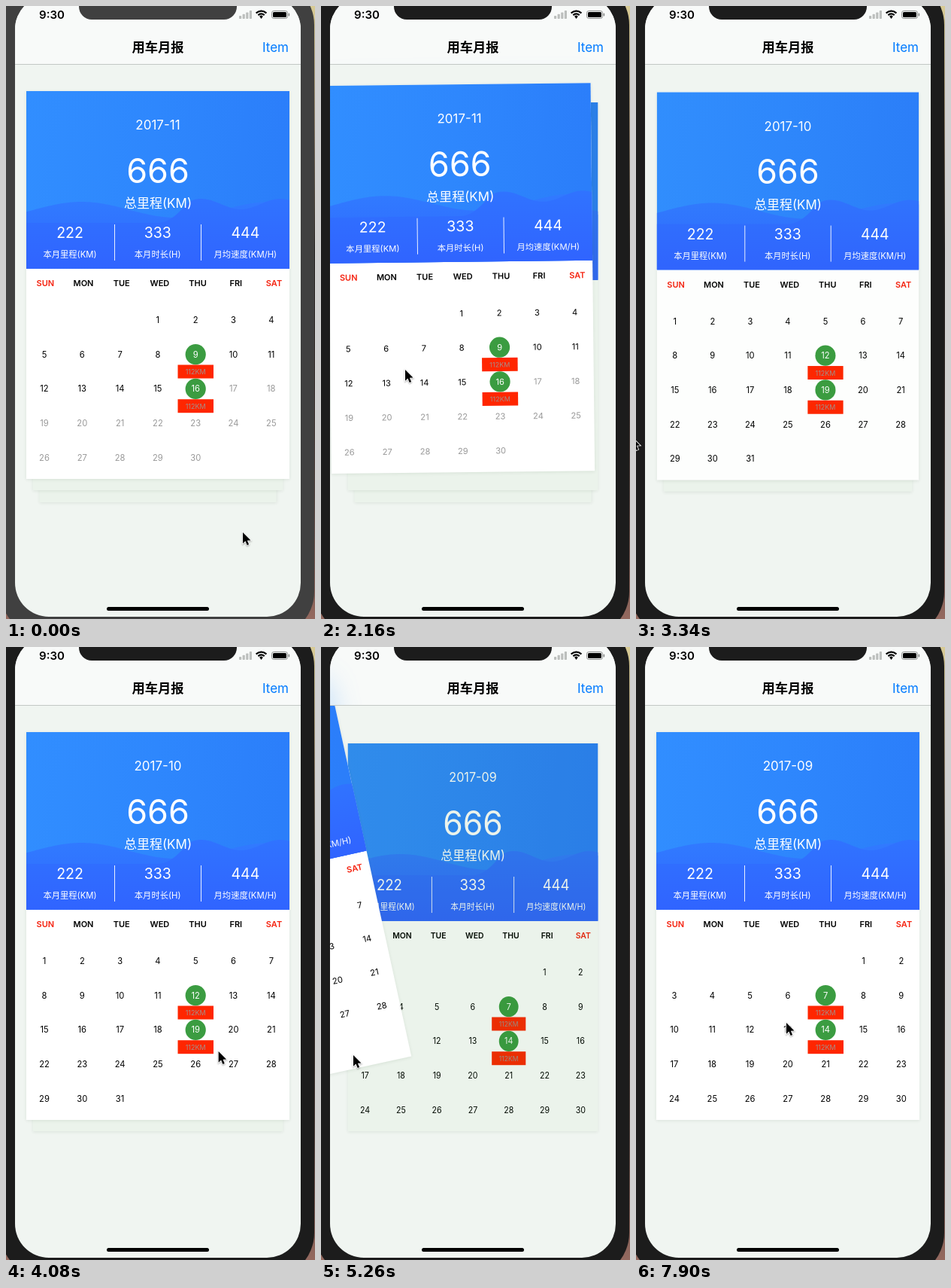
Write an HTML page with a canvas that moves like this. It is 411 by 814 pixels and loops after 8 s.

```html
<!DOCTYPE html>
<html lang="zh-CN">
<head>
<meta charset="utf-8">
<style>
  html, body { margin: 0; width: 100%; height: 100%; overflow: hidden; background: #1c1c1c; }
  canvas { display: block; width: 411px; height: 814px; }
</style>
</head>
<body>
<canvas id="stage"></canvas>
<script>
const W = 411, H = 814, LOOP = 8000, STEP = 147.1, LEAD = 98;
const canvas = document.getElementById('stage');
const ratio = window.devicePixelRatio || 1;
canvas.width = W * ratio;
canvas.height = H * ratio;
const ctx = canvas.getContext('2d');
const FONT = 'Inter, "Noto Sans CJK SC", "Noto Sans CJK", "Noto Sans", sans-serif';

// Card geometry in stage coordinates; times are counted in steps
const CARD = { x: 27, y: 113, w: 350, h: 515, head: 235.7 };
const CX = CARD.x + CARD.w / 2, CY = CARD.y + CARD.h / 2;
const TURN = 0.0007; // radians of tilt per dragged pixel
const FOCUS = 13;    // the window gains focus

const cards = [
  { title: '2017-11', first: 3, days: 30, today: 16, swipe: { start: 13.3, end: 19, dx: -258, dy: -110, arc: -40 } },
  { title: '2017-10', first: 0, days: 31, today: 31, swipe: { start: 27.5, end: 35, dx: -308, dy: -41, arc: -306 } },
  { title: '2017-09', first: 5, days: 30, today: 30 }
];

// Pointer stops: time, x, y
const stops = [
  [6, 315, 699], [9, 289, 597], [12, 289, 597], [14, 112, 483], [19, 30, 486], [22, -5, 573],
  [26, 330, 590], [29, 188, 431], [35, 43, 542], [42, 14, 490], [46, 171, 448], [50, 65, 515],
  [52, 289, 552], [53, 200, 499]
];

const clamp = v => Math.min(1, Math.max(0, v));
const smooth = v => clamp(v) ** 2 * (3 - 2 * clamp(v));

function pointer(k) {
  const i = stops.findIndex(s => s[0] > k);
  if (i < 0) return stops[stops.length - 1].slice(1);
  if (!i) return stops[0].slice(1);
  const [t0, x0, y0] = stops[i - 1], [t1, x1, y1] = stops[i];
  const p = (k - t0) / (t1 - t0);
  return [x0 + (x1 - x0) * p, y0 + (y1 - y0) * p];
}

// Pull along an arc that eases out, then fling to the left
function offset(swipe, k) {
  if (!swipe || k < swipe.start) return { dx: 0, dy: 0 };
  const p = 1 - Math.exp(-(((k - swipe.start) / 2.8) ** 2));
  const fling = 110 * Math.max(0, k - swipe.end) ** 2;
  return { dx: swipe.dx * p - fling, dy: swipe.dy * p + swipe.arc * p * (1 - p) + fling * .2 };
}

// How far the stack has moved up after the swipe
const rise = (swipe, k) => swipe ? 1 - (1 - clamp((k - swipe.end - 1) / 3.75)) ** 3 : 0;

function rect(x, y, w, h, color) {
  ctx.fillStyle = color;
  ctx.fillRect(x, y, w, h);
}

function round(x, y, w, h, r, color) {
  ctx.beginPath();
  ctx.roundRect(x, y, w, h, r);
  if (color) {
    ctx.fillStyle = color;
    ctx.fill();
  }
}

// Text centred on y
function text(s, x, y, size, color, weight = 400, align = 'center') {
  ctx.font = `${weight} ${size}px ${FONT}`;
  ctx.textAlign = align;
  ctx.fillStyle = color;
  ctx.fillText(s, x, y + size * .364);
}

function gradient(x0, y0, x1, y1, ...colors) {
  const g = ctx.createLinearGradient(x0, y0, x1, y1);
  colors.forEach((c, i) => g.addColorStop(i / (colors.length - 1), c));
  return g;
}

// Hill line height(u), u from 0 to 1, filled down to the end of the card head
function wave(height, ...colors) {
  const { x, y, w, head } = CARD;
  ctx.beginPath();
  ctx.moveTo(x, y + head);
  for (let i = 0; i <= w; i += 2) ctx.lineTo(x + i, height(i / w));
  ctx.lineTo(x + w, y + head);
  ctx.fillStyle = gradient(0, 255, 0, y + head, ...colors);
  ctx.fill();
}

const backHill = u => 270.5 - 10.5 * Math.cos((u - .21) / .72 * 2 * Math.PI);
function frontHill(u) {
  const s = smooth((u - .5) / .14);
  return 288 - s * (25 + 7 * Math.cos((u - .665) / .3 * 2 * Math.PI));
}

function cardHead(title) {
  const { x, y, w, head } = CARD;
  rect(x, y, w, head, gradient(x, y, x + w, y + 40, '#318eff', '#2e87fd', '#2b7efa'));
  wave(backHill, '#317bff', '#2f68ff');
  wave(frontHill, '#3073ff', '#3064ff');
  text(title, CX, 158, 17, '#fff');
  text('666', CX, 218.5, 45, '#fff');
  text('总里程(KM)', CX, 262, 17, '#fff');
  [['222', '本月里程(KM)'], ['333', '本月时长(H)'], ['444', '月均速度(KM/H)']].forEach(([n, label], i) => {
    const cx = 85 + i * 116.7;
    text(n, cx, 301, 19.5, '#fff');
    text(label, cx, 330, 11.3, '#fff');
    if (i) rect(144 + (i - 1) * 115, 290, 1, 48, 'rgba(255,255,255,.9)');
  });
}

function cardDays({ first, days, today }) {
  'SUN MON TUE WED THU FRI SAT'.split(' ').forEach((name, i) =>
    text(name, 52.3 + i * 50.7, 368, 11, i % 6 ? '#000' : '#f5220f', 600));
  for (let d = 1; d <= days; d++) {
    const cell = d - 1 + first, col = cell % 7, row = Math.floor(cell / 7);
    const x = 51 + col * 50.3, y = 417 + row * 45.7;
    const marked = col === 4 && (row === 1 || row === 2);
    if (marked) {
      ctx.beginPath();
      ctx.arc(x, y, 13.6, 0, Math.PI * 2);
      ctx.fillStyle = '#3b9c41';
      ctx.fill();
      rect(228.5, y + 13.8, 47.5, 18, '#ff2600');
      text('112KM', x, y + 23, 9, 'rgba(153,153,153,.9)');
    }
    text(d, x, y, 11.2, marked ? '#fff' : d > today ? '#999' : '#000');
  }
}

function place(depth, dx, dy) {
  ctx.translate(CX + dx, CY + dy + 15 * depth + .5 * Math.max(0, depth * (depth - 1)));
  ctx.rotate(dx * TURN);
  ctx.scale(1 - .05 * depth, 1);
  ctx.translate(-CX, -CY);
}

function drawCard(card, depth, { dx, dy }) {
  const { x, y, w, h } = CARD;
  ctx.save();
  place(depth, dx, dy);
  ctx.save();
  ctx.shadowColor = 'rgba(60,90,60,.12)';
  ctx.shadowBlur = 4 * ratio;
  ctx.shadowOffsetY = ratio;
  rect(x, y, w, h, '#fff');
  ctx.restore();
  cardHead(card.title);
  cardDays(card);
  if (depth > 0) rect(x, y, w, h, `rgba(35,125,35,${.09 * Math.min(depth, 1)})`);
  ctx.restore();
}

function statusBar() {
  text('9:30', 61, 11.5, 15, '#000', 600);
  for (let i = 0; i < 4; i++) {
    const h = 4 + i * 2.3;
    round(310 + i * 4.6, 17 - h, 3.2, h, .8, '#bcbfbd');
  }
  ctx.strokeStyle = '#000';
  ctx.lineWidth = 2.2;
  for (const r of [5.6, 9.4]) {
    ctx.beginPath();
    ctx.arc(339.5, 16, r, -Math.PI * .76, -Math.PI * .24);
    ctx.stroke();
  }
  ctx.beginPath();
  ctx.moveTo(339.5, 17);
  ctx.arc(339.5, 16, 3.2, -Math.PI * .76, -Math.PI * .24);
  ctx.fillStyle = '#000';
  ctx.fill();
  round(353.5, 6.5, 21, 10, 2.8);
  ctx.strokeStyle = '#8b8d8c';
  ctx.lineWidth = 1;
  ctx.stroke();
  round(355, 8, 18, 7, 1.5, '#000');
  round(375.6, 9.6, 1.6, 4, 1, '#8b8d8c');
}

function navBar(top) {
  ctx.save();
  ctx.beginPath();
  ctx.rect(12, -20, 380, 97);
  ctx.clip();
  rect(12, -20, 380, 97, '#f8faf9');
  if (top.dx) {
    // Translucent bar: soft tint of the card head below it
    ctx.globalAlpha = .22;
    ctx.filter = `blur(${17 * ratio}px)`;
    place(0, top.dx, top.dy);
    rect(CARD.x, CARD.y, CARD.w, CARD.head, '#2e92ff');
  }
  ctx.restore();
  rect(12, 77, 380, 1, '#c3c8c5');
  text('用车月报', CX, 55, 17.3, '#000', 600);
  text('Item', 376, 55, 17, '#007aff', 400, 'right');
}

function cursor(x, y) {
  ctx.save();
  ctx.translate(x, y);
  ctx.scale(.92, .92);
  ctx.beginPath();
  [[0, 0], [0, 16], [3.7, 12.6], [6.2, 18.4], [8.8, 17.3], [6.4, 11.7], [11.4, 11.4]]
    .forEach(p => ctx.lineTo(...p));
  ctx.closePath();
  ctx.shadowColor = 'rgba(0,0,0,.35)';
  ctx.shadowBlur = 2 * ratio;
  ctx.shadowOffsetY = ratio;
  ctx.strokeStyle = '#fff';
  ctx.lineWidth = 1.8;
  ctx.stroke();
  ctx.shadowColor = 'transparent';
  ctx.fillStyle = '#000';
  ctx.fill();
  ctx.restore();
}

function draw(k) {
  ctx.setTransform(ratio, 0, 0, ratio, 0, 0);
  const bezel = k < FOCUS ? '#404040' : '#1c1c1c';
  rect(0, 0, W, H, gradient(0, 0, 0, H, '#d9cc96', '#8d7c66', '#2a2624', '#3a302d', '#55443f', '#94695f'));
  round(-7, -35, 417, 873, 60, bezel);

  ctx.save();
  round(12, -14, 380, 825, 45, '#f0f5f1');
  ctx.clip();
  const risen = cards.reduce((sum, c) => sum + rise(c.swipe, k), 0);
  const shown = cards.filter(c => !c.swipe || k < c.swipe.end + 2);
  for (const card of shown.slice().reverse())
    drawCard(card, Math.max(0, cards.indexOf(card) - risen), offset(card.swipe, k));
  navBar(offset(shown[0].swipe, k));
  statusBar();
  round(134, 798, 136, 5, 2.5, '#000');
  ctx.restore();

  round(97, -30, 210, 48, 17, bezel);
  cursor(...pointer(k));
}

function tick(now) {
  draw(Math.floor((now % LOOP - LEAD) / STEP));
  requestAnimationFrame(tick);
}
requestAnimationFrame(tick);
</script>
</body>
</html>
```
